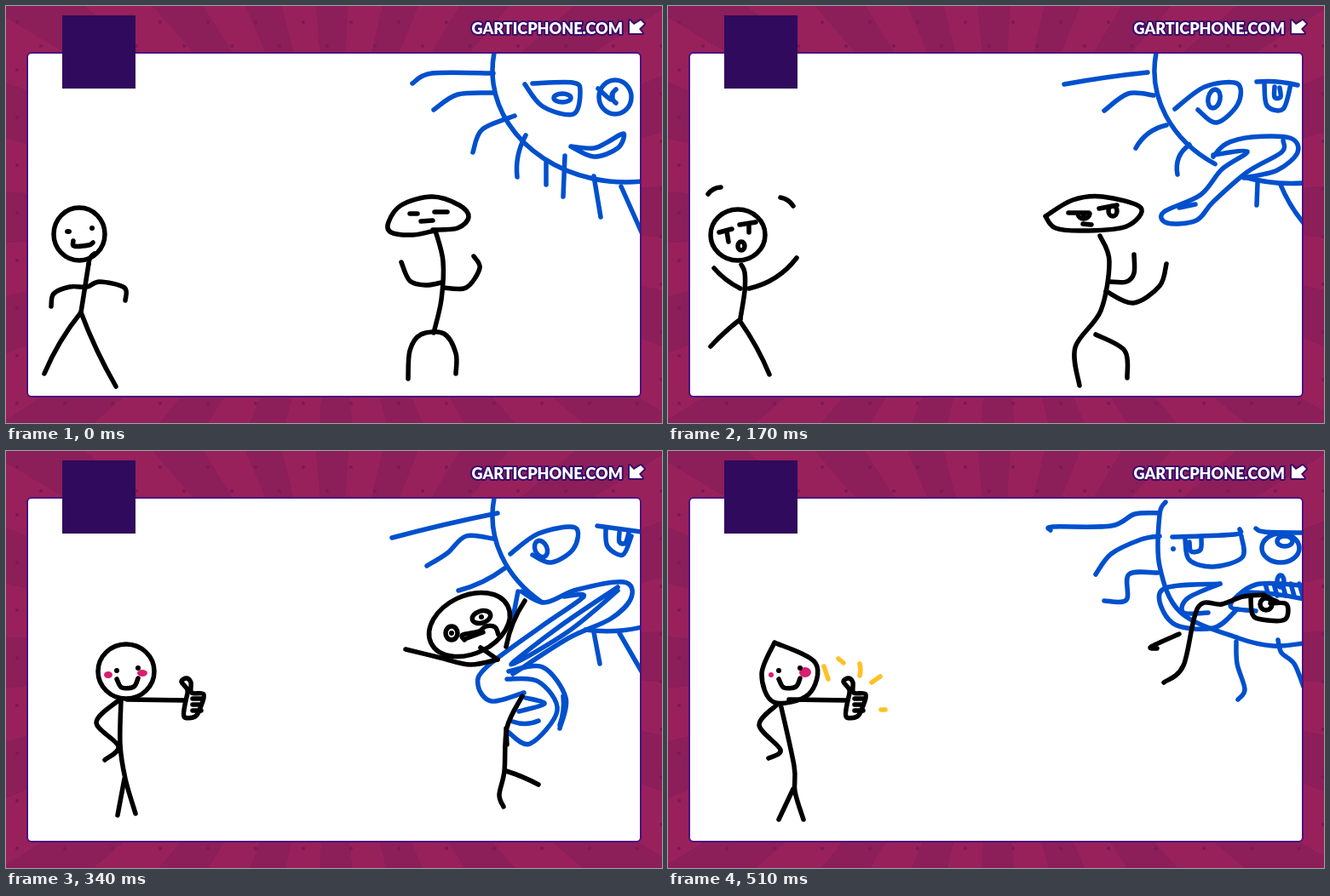
An HTML page with a canvas that plays this animation: 770 px wide and 490 px high, repeating every 680 ms.

```html
<!DOCTYPE html>
<html lang="en">
<head>
<meta charset="utf-8">
<title>Sun doodle</title>
<style>
html, body { margin: 0; width: 100%; height: 100%; overflow: hidden; background: #96205c; }
svg, canvas { position: absolute; left: 0; top: 0; }
.rays { position: absolute; inset: 0; background: repeating-conic-gradient(from 4deg at 50% 50%, #98215c 0 9deg, #8c1e5a 9deg 18deg); }
text { font: 900 18px Lato, "Open Sans", sans-serif; fill: #fff; }
.outlined { stroke: #3a0c68; stroke-width: 4; stroke-linejoin: round; paint-order: stroke; }
</style>
</head>
<body>
<div class="rays"></div>
<svg width="770" height="490">
  <defs>
    <pattern id="dots" width="56" height="56" patternUnits="userSpaceOnUse">
      <g fill="#7c1a55"><circle cx="13" cy="19" r="2.2"/><circle cx="41" cy="47" r="2.2"/></g>
    </pattern>
  </defs>
  <rect width="770" height="490" fill="url(#dots)"/>
  <rect x="25" y="55" width="720" height="404" rx="5" fill="#fff" stroke="#4d1180" stroke-width="2"/>
  <text class="outlined" x="724" y="33" text-anchor="end">GARTICPHONE.COM</text>
  <path class="outlined" d="M745 17L749 21L743 27L747 32H732V17L737 22Z" fill="#fff"/>
</svg>
<canvas id="board" width="770" height="490"></canvas>
<svg width="770" height="490"><rect x="66" y="11" width="86" height="86" fill="#300a5c"/></svg>
<script>
const c = document.getElementById("board").getContext("2d");
const BLACK = "#000", BLUE = "#0050cd", PINK = "#d91e6f", YELLOW = "#ffc126";
const HOLD = 170, TURN = 2 * Math.PI;

const pen = color => c.strokeStyle = c.fillStyle = color;

// Smooth stroke through x, y pairs.
function curve(...v) {
  const last = v.length / 2 - 1;
  const at = (i, k) => v[2 * Math.max(0, Math.min(last, i)) + k];
  c.beginPath();
  c.moveTo(v[0], v[1]);
  for (let i = 0; i < last; i++) {
    const handle = (j, side, k) => at(j, k) + side * (at(j + 1, k) - at(j - 1, k)) / 6;
    c.bezierCurveTo(handle(i, 1, 0), handle(i, 1, 1),
      handle(i + 1, -1, 0), handle(i + 1, -1, 1), at(i + 1, 0), at(i + 1, 1));
  }
  c.stroke();
}

// Stroke between two points, bulging to the left of its direction.
function bow(x, y, x2, y2, bulge = 0) {
  const k = 2 * bulge / Math.hypot(x2 - x, y2 - y);
  c.beginPath();
  c.moveTo(x, y);
  c.quadraticCurveTo((x + x2) / 2 + k * (y2 - y), (y + y2) / 2 - k * (x2 - x), x2, y2);
  c.stroke();
}

function oval(x, y, rx, ry, tilt = 0, from = 0, to = TURN) {
  c.beginPath();
  c.ellipse(x, y, rx, ry, tilt, from, to);
  c.stroke();
}

function dot(x, y, rx = 3, ry = 3) {
  c.beginPath();
  c.ellipse(x, y, rx, ry, 0, 0, TURN);
  c.fill();
}

// Sun's rim, from its lower end round to the top.
function rim(start) {
  pen(BLUE);
  oval(728, 76, 157, 131, 0, start, 3.3);
}

function smilingSun() {
  rim(1.45);
  curve(477, 91, 500, 79, 572, 79);
  curve(502, 122, 530, 104, 573, 102);
  curve(548, 172, 559, 145, 597, 129);
  bow(600, 201, 610, 152, 4);
  bow(634, 184, 634, 210);
  bow(656, 176, 654, 224);
  bow(690, 200, 698, 248);
  bow(722, 212, 746, 266);
  curve(618, 91, 665, 90, 674, 100, 666, 127, 630, 118, 609, 92);
  oval(653, 108, 10, 5);
  oval(715, 107, 19, 20);
  curve(695, 97, 710, 110, 712, 103);
  bow(716, 98, 716, 114, -5);
  curve(663, 165, 690, 177, 718, 167, 725, 150, 706, 160, 690, 167, 663, 165);
}

function calmPair() {
  pen(BLACK);
  oval(86, 268, 30, 31);
  dot(73, 265, 4);
  dot(101, 261);
  curve(79, 276, 80, 282, 97, 281, 102, 278);
  bow(104, 291, 97, 303, -2);
  bow(97, 303, 88, 360);
  curve(53, 353, 56, 338, 75, 330, 95, 330, 110, 324, 139, 331, 140, 346);
  bow(45, 432, 88, 360, 3);
  bow(88, 360, 129, 447, -2);

  curve(503, 264, 478, 269, 452, 266, 449, 254, 464, 234, 500, 224, 532, 234, 543, 248, 530, 261, 501, 263);
  bow(474, 244, 483, 244);
  bow(503, 242, 518, 242);
  bow(487, 253, 501, 252);
  curve(504, 264, 513, 300, 511, 345, 502, 384);
  curve(464, 301, 474, 323, 493, 328, 511, 325);
  curve(513, 331, 540, 331, 556, 308, 549, 294);
  curve(472, 438, 474, 405, 487, 386, 514, 385, 528, 408, 528, 432);
}

function tongueOut() {
  rim(2.15);
  curve(640, 177, 655, 162, 685, 154, 730, 155, 739, 172, 715, 193, 676, 202);
  curve(722, 158, 720, 172, 680, 195, 640, 230, 620, 252, 586, 255, 582, 242, 625, 222, 650, 192, 680, 171, 640, 175);
  bow(600, 237, 619, 233);
  bow(465, 92, 563, 78, 1);
  curve(512, 123, 540, 103, 570, 105);
  bow(549, 167, 585, 140, 5);
  bow(598, 198, 612, 163, 6);
  bow(676, 201, 746, 208, -3);
  bow(692, 208, 691, 234);
  bow(719, 210, 746, 255, -2);
  curve(595, 121, 630, 95, 668, 91, 669, 115, 644, 137, 622, 122);
  oval(641, 109, 7, 11, .2);
  bow(691, 89, 739, 93, 2);
  curve(700, 91, 703, 117, 722, 121, 731, 92);
  curve(712, 95, 712, 107, 719, 107, 718, 96);
}

function startledPair() {
  pen(BLACK);
  oval(82, 269, 32, 30);
  bow(47, 221, 62, 213, 2);
  bow(132, 225, 147, 235, 2);
  bow(60, 266, 75, 262);
  bow(69, 265, 71, 277);
  bow(84, 257, 103, 254);
  bow(95, 257, 95, 266);
  oval(86, 282, 4, 5);
  curve(86, 304, 90, 313, 90, 335, 85, 367);
  bow(54, 308, 85, 332, -2);
  bow(95, 332, 151, 296, -6);
  bow(50, 400, 85, 368, 1);
  bow(85, 371, 119, 433, 2);

  curve(443, 247, 475, 228, 510, 224, 555, 237, 538, 259, 490, 264, 455, 261, 443, 247);
  bow(470, 243, 494, 243);
  oval(488, 244, 7, 6, 0, 0, 3);
  dot(488, 246);
  bow(506, 238, 527, 234);
  oval(522, 241, 5, 6);
  bow(487, 256, 497, 257);
  curve(507, 270, 518, 300, 508, 358, 478, 401, 483, 446);
  curve(519, 324, 538, 324, 547, 314, 547, 292);
  curve(514, 335, 546, 349, 577, 329, 585, 303);
  curve(502, 386, 536, 405, 539, 437);
}

function grabbingSun() {
  rim(2.25);
  curve(605, 165, 632, 178, 670, 163, 725, 154, 734, 172, 710, 197, 660, 220, 595, 262);
  curve(655, 171, 678, 171, 630, 205, 565, 253, 554, 275, 570, 294, 608, 284);
  curve(718, 160, 650, 206, 593, 251, 660, 212, 718, 164);
  curve(590, 259, 630, 254, 657, 290, 650, 326);
  curve(588, 268, 625, 271, 647, 305, 615, 344, 589, 330);
  bow(654, 288, 650, 322, 2);
  bow(595, 318, 625, 317, -3);
  curve(610, 290, 632, 297, 602, 306);
  bow(680, 210, 746, 207, -3);
  bow(690, 213, 697, 250);
  bow(720, 214, 746, 259);
  bow(453, 102, 577, 73, 1);
  curve(494, 135, 518, 120, 540, 100, 572, 103);
  bow(531, 164, 585, 138, -3);
  bow(595, 196, 601, 165);
  curve(592, 121, 625, 97, 668, 90, 666, 115, 640, 131, 618, 122);
  oval(628, 115, 7, 10, -.4);
  bow(694, 88, 746, 95);
  curve(704, 90, 706, 112, 724, 122, 734, 100);
  curve(720, 96, 720, 107, 727, 108, 731, 96);
}

function caughtFriend() {
  pen(BLACK);
  oval(544, 204, 50, 34, -.45);
  oval(523, 214, 7, 8);
  dot(523, 214);
  oval(558, 195, 11, 7, -.3);
  dot(558, 195);
  curve(538, 222, 536, 216, 555, 212, 563, 206, 574, 207, 578, 216);
  bow(541, 220, 560, 213);
  bow(557, 231, 577, 245);
  curve(469, 233, 510, 243, 545, 251, 577, 245);
  bow(609, 176, 587, 230, -3);
  curve(606, 288, 588, 325, 585, 376, 579, 404, 584, 418);
  bow(587, 326, 588, 345);
  bow(587, 376, 625, 392, 1);
}

function chewingSun() {
  pen(BLUE);
  curve(584, 60, 577, 75, 577, 135, 602, 190, 670, 220, 710, 229, 746, 226);
  curve(449, 93, 452, 89, 520, 88, 548, 74, 577, 73);
  curve(502, 145, 520, 121, 555, 104, 577, 100);
  curve(512, 176, 538, 175, 541, 145, 575, 143);
  dot(593, 115);
  curve(592, 101, 665, 98, 671, 92);
  curve(607, 104, 612, 128, 640, 136, 674, 125, 673, 100);
  curve(612, 107, 614, 118, 625, 116, 626, 102);
  curve(690, 91, 700, 95, 746, 96);
  oval(719, 114, 22, 17);
  oval(724, 106, 9, 6);
  curve(648, 156, 580, 163, 592, 202, 640, 208, 668, 186);
  curve(648, 156, 610, 173, 605, 190, 634, 190);
  curve(690, 188, 660, 182, 690, 157, 746, 158);
  bow(677, 166, 746, 174, 2);
  for (let x = 701; x < 745; x += 10) bow(x, 156, x + 4, 170);
  oval(719, 153, 4, 7);
  curve(667, 224, 668, 250, 677, 280, 669, 292);
  curve(716, 222, 720, 237, 735, 250, 746, 277);

  pen(BLACK);
  curve(582, 272, 605, 252, 622, 184, 650, 180, 675, 171, 700, 169);
  curve(574, 232, 567, 230, 600, 215);
  curve(684, 172, 686, 192, 697, 198, 724, 198, 726, 180, 707, 179);
  oval(702, 180, 7, 7);
  bow(702, 171, 715, 177);
}

// The parts that stay put while the thumb is up.
function thumb() {
  pen(BLACK);
  dot(130, 258);
  dot(155, 255);
  curve(130, 268, 136, 278, 150, 277, 155, 267);
  bow(142, 292, 211, 293);
  curve(211, 293, 213, 281, 206, 271, 212, 267, 217, 272, 218, 284, 232, 286, 228, 302, 222, 312, 209, 312, 211, 293);
  for (let y = 291; y < 306; y += 7) bow(219, y, 229, y);
}

function blushingFriend() {
  pen(PINK);
  dot(120, 263, 5, 4);
  dot(160, 261, 6, 4);
  thumb();
  oval(141, 259, 33, 32);
  curve(135, 293, 134, 345, 140, 385, 152, 426);
  bow(139, 385, 131, 428);
  curve(132, 293, 106, 319, 132, 347, 116, 363);
}

function proudFriend() {
  pen(PINK);
  dot(121, 263);
  dot(161, 260, 7, 6);
  thumb();
  curve(125, 225, 173, 249, 165, 286, 124, 295, 110, 262, 125, 225);
  curve(132, 297, 148, 370, 149, 400, 159, 433);
  bow(147, 397, 130, 433);
  curve(128, 298, 107, 322, 132, 351, 118, 361);
  pen(YELLOW);
  bow(183, 253, 188, 268);
  bow(200, 244, 206, 249);
  bow(225, 250, 225, 264, 1);
  bow(239, 272, 249, 265);
  bow(250, 304, 255, 304);
}

const scenes = [
  [smilingSun, calmPair],
  [tongueOut, startledPair],
  [grabbingSun, caughtFriend, blushingFriend],
  [chewingSun, proudFriend]
];

c.beginPath();
c.rect(26, 56, 718, 402);
c.clip();
c.lineWidth = 5.5;
c.lineCap = c.lineJoin = "round";

function play() {
  c.clearRect(0, 0, 770, 490);
  scenes[Math.floor(performance.now() / HOLD) % scenes.length].forEach(draw => draw());
  requestAnimationFrame(play);
}
play();
</script>
</body>
</html>
```
